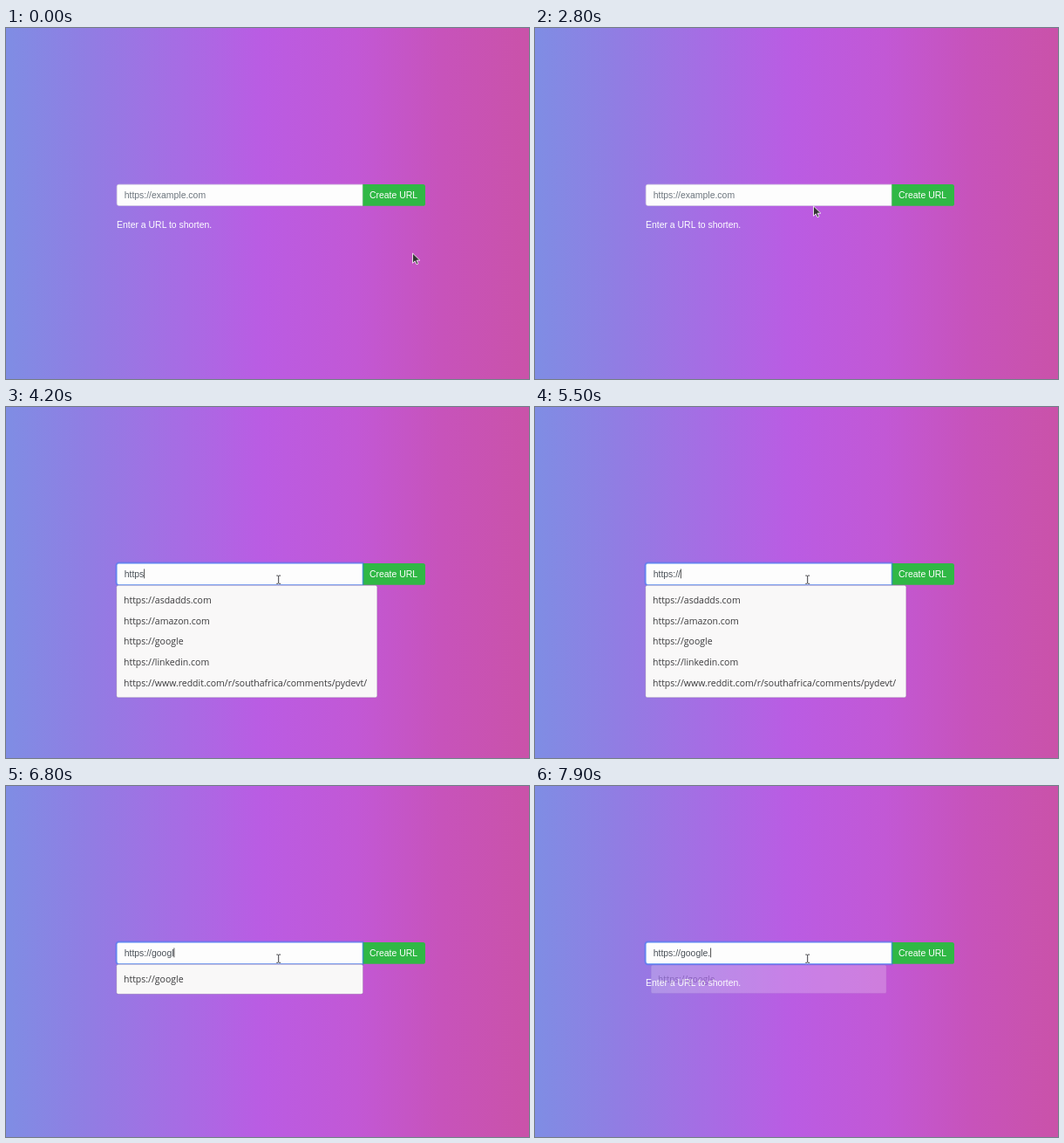
Recreate the animation shown at these times as an HTML page. Size 600 by 402 pixels, loop 8 s.

```html
<!DOCTYPE html>
<html lang="en">
<head>
<meta charset="utf-8">
<title>URL shortener</title>
<style>
  html, body { margin: 0; width: 100%; height: 100%; overflow: hidden; }
  svg { display: block; width: 600px; height: 402px; }
  .ui { font: 10.45px "Liberation Sans", Arial, sans-serif; }
  .menu { font: 500 10.5px "Open Sans", "Noto Sans", sans-serif; fill: #3a3a3c; }
</style>
</head>
<body>
<svg viewBox="0 0 600 402">
  <defs>
    <linearGradient id="sky">
      <stop offset="0" stop-color="#7f8de4"/>
      <stop offset=".167" stop-color="#927ce3"/>
      <stop offset=".333" stop-color="#a76ce4"/>
      <stop offset=".49" stop-color="#ba5ce3"/>
      <stop offset=".67" stop-color="#c258d5"/>
      <stop offset=".83" stop-color="#c753bb"/>
      <stop offset="1" stop-color="#ca52a9"/>
    </linearGradient>
  </defs>
  <rect width="600" height="402" fill="url(#sky)"/>
  <text class="ui" x="127" y="229.3" fill="#fff" font-style="italic">Enter a URL to shorten.</text>

  <path d="M409 179h69.4a2.6 2.6 0 0 1 2.6 2.6v19.6a2.6 2.6 0 0 1-2.6 2.6H409z" fill="#30b845"/>
  <text class="ui" x="417" y="194.6" fill="#fff">Create URL</text>

  <path id="ring" d="M129.6 179H409v24.7H129.6a2.6 2.6 0 0 1-2.6-2.6v-19.5a2.6 2.6 0 0 1 2.6-2.6z"
    fill="none" stroke="#2f7bf5" stroke-opacity=".45" stroke-width="3"/>
  <path id="field" d="M129.6 179.2H409v24.3H129.6a2.4 2.4 0 0 1-2.4-2.4v-19.5a2.4 2.4 0 0 1 2.4-2.4z"
    fill="#fdfdfd" stroke-width=".7"/>
  <text id="value" class="ui" x="135.7" y="194.6"></text>
  <path id="caret" d="M0 185.5v10.8" stroke="#222" stroke-width=".8"/>

  <g id="popup">
    <rect id="panel" x="126.8" y="204.3" rx="2" fill="#f9f8f8" stroke="#6d5a86" stroke-opacity=".4" stroke-width=".7"/>
    <g id="rows" class="menu"></g>
  </g>

  <path id="arrow" d="M.5 0V11.3L3.2 8.8 5 12.8 6.9 12 5.1 8.1H8.8z"
    fill="#333" stroke="#fff" stroke-width=".8" stroke-linejoin="round"/>
  <g id="beam" fill="none">
    <path d="M310.3 193.1h1.6l.8.6.8-.6h1.6M312.7 193.7v8M310.3 202.3h1.6l.8-.6.8.6h1.6" stroke="#fff" stroke-opacity=".6" stroke-width="2"/>
    <path d="M310.3 193.1h1.6l.8.6.8-.6h1.6M312.7 193.7v8M310.3 202.3h1.6l.8-.6.8.6h1.6" stroke="#3c3c40" stroke-width="1"/>
  </g>
</svg>
<script>
const LOOP = 8000, FOCUS = 4200, FILTER = 5900, CLOSE = 7700;

// [time, x, y] of the arrow tip
const path = [
  [0, 466, 258], [600, 465, 258], [800, 459, 258], [900, 450, 256], [1000, 437, 252],
  [1100, 418, 246], [1300, 395, 238.5], [1400, 381, 232], [1500, 368, 227], [1600, 357, 222],
  [1700, 348, 218], [1900, 340, 214], [2000, 335, 212], [2200, 330, 210], [2400, 327, 208],
  [2500, 325, 207], [2600, 323, 206], [2700, 321, 205], [2800, 319, 204]
];

// [time, text typed by then]
const typing = [
  [4200, "https"], [4600, "https:"], [4900, "https:/"], [5100, "https://"], [5800, "https://g"],
  [6100, "https://go"], [6300, "https://goo"], [6500, "https://goog"], [6700, "https://googl"],
  [7000, "https://google"], [7700, "https://google."]
];

const history = [
  "https://asdadds.com", "https://amazon.com", "https://google", "https://linkedin.com",
  "https://www.reddit.com/r/southafrica/comments/pydevt/"
];

const el = id => document.getElementById(id);
const set = (id, attrs) => Object.entries(attrs).forEach(([k, v]) => el(id).setAttribute(k, v));
const show = (id, on) => el(id).style.display = on ? "" : "none";
const latest = (steps, t) => steps.filter(s => s[0] <= t).pop();

function drawPopup(t) {
  show("popup", t >= FOCUS);
  if (t < FOCUS) return;
  const items = t < FILTER ? history : [history[2]];
  const width = t < FILTER ? 299 : 282.7;
  const height = 10.4 + 23.6 * items.length;
  set("panel", { width, height });
  el("rows").innerHTML = items
    .map((s, i) => `<text x="135" y="${225.2 + 23.6 * i}">${s}</text>`).join("");

  const closing = Math.max(0, Math.floor((t - CLOSE) / 100)) / 2;
  const scale = 1 - 0.045 * closing;
  const cx = 126.8 + width / 2, cy = 204.3 + height / 2;
  set("popup", {
    opacity: 1 - 0.77 * closing,
    transform: `translate(${cx} ${cy}) scale(${scale}) translate(${-cx} ${-cy})`
  });
}

function draw(t) {
  const focused = t >= FOCUS;
  const [keyTime, text] = latest(typing, t) || [0, "https://example.com"];
  const [, x, y] = latest(path, t);

  set("arrow", { transform: `translate(${x} ${y})` });
  show("arrow", !focused);
  show("beam", focused);
  show("ring", focused);
  set("field", { stroke: focused ? "#6aa3f5" : "#d5cfe0" });

  el("value").textContent = text;
  set("value", { fill: focused ? "#495057" : "#6c757d" });
  show("caret", focused && (t - keyTime) % 1000 < 500);
  set("caret", { transform: `translate(${136 + el("value").getComputedTextLength()} 0)` });
  drawPopup(t);
}

function tick() {
  draw(performance.now() % LOOP);
  requestAnimationFrame(tick);
}
tick();
</script>
</body>
</html>
```
